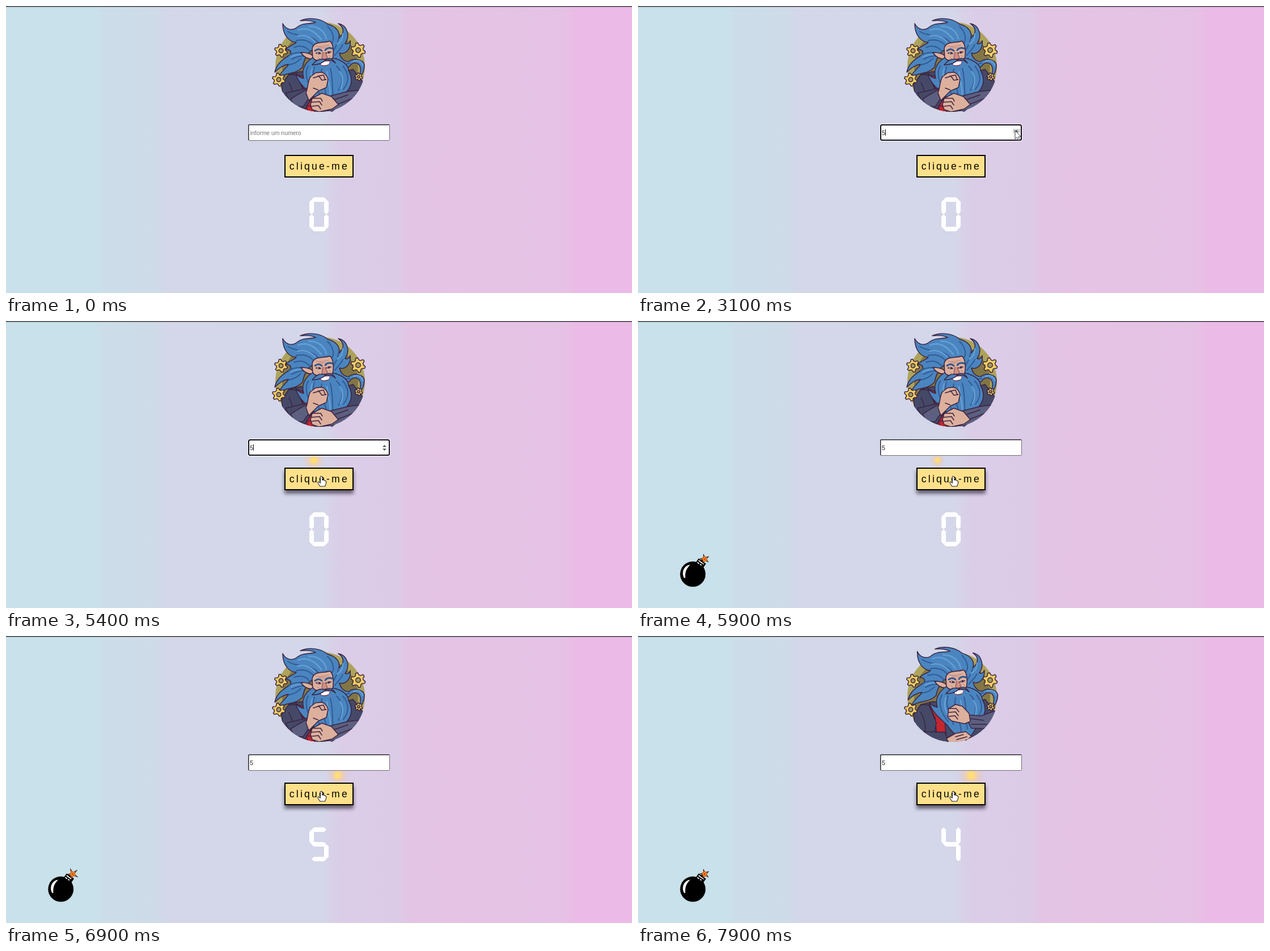
Animation, 1104 px wide and 507 px high, one loop 8 s. Source, as an HTML page:

```html
<!DOCTYPE html>
<html lang="pt">
<head>
<meta charset="utf-8">
<style>
html, body { margin: 0; width: 100%; height: 100%; overflow: hidden; }
svg {
  display: block; width: 100vw; height: 100vh;
  background: linear-gradient(90deg, #c8e1ea 14.2%, #ccdde9 15.6%, #cedbe9 23.8%, #d3d7e9 25.6%,
    #d4d6e9 50.5%, #dbcde7 53.5%, #dccbe7 62.5%, #e4c4e5 64.5%, #e5c2e5 89%, #ecbae6 91%);
}
text { font-family: "Liberation Sans", Arial, sans-serif; }
.ink { stroke: #3a2340; stroke-width: 1.5; stroke-linejoin: round; }
.line { fill: none; stroke-linecap: round; }
.skin { fill: #ddb09d; }
.robe { fill: #454967; }
.sleeve { fill: #5c5f80; }
.red { fill: #c2262f; }
.hair { fill: #4a85c0; }
.shade { stroke: #335a94; stroke-width: 2; }
.shine { stroke: #649fd4; stroke-width: 2.6; }
</style>
</head>
<body>
<svg viewBox="0 0 1104 507" preserveAspectRatio="none">
  <defs>
    <clipPath id="disc"><path d="M474 0H634V107A79.5 79.5 0 0 1 474 107Z"/></clipPath>
    <filter id="blur" x="-20%" y="-50%" width="140%" height="200%"><feGaussianBlur stdDeviation="3.4"/></filter>
    <radialGradient id="glow">
      <stop offset="0" stop-color="#ffe282"/><stop offset=".24" stop-color="#ffdb74"/>
      <stop offset=".36" stop-color="#f6d29c" stop-opacity=".75"/><stop offset=".65" stop-color="#eccaa9" stop-opacity=".4"/>
      <stop offset="1" stop-color="#e8c3b8" stop-opacity="0"/>
    </radialGradient>
  </defs>
  <rect width="1104" height="1.6" fill="#48454d"/>

  <g id="wizard">
    <circle cx="554" cy="107" r="79" fill="#ada35b"/>
    <circle cx="554" cy="107" r="67" fill="#827646"/>
    <g clip-path="url(#disc)">
      <path class="robe ink" d="M487 139L499 121L519 116L590 118L612 112L634 140V190H500Z"/>
      <path class="red ink" d="M513 121L528 126L541 148L544 188L528 186L524 145Z"/>
      <path class="robe ink" d="M499 121L513 122L526 153L520 190H492L486 139Z"/>
      <path class="line ink" d="M499 135C506 148 508 160 506 172"/>
    </g>
    <g id="head">
      <g id="mane">
        <path class="hair ink" d="M540 78C530 84 525 98 523 108C510 122 496 116 480 127C485 114 495 111 498 103C488 104 480 111 474 117C477 100 491 93 501 86
          C505 80 499 76 493 77C498 70 507 70 512 64C500 64 488 52 488 31C494 43 506 44 514 37C524 29 536 32 546 29
          C538 25 528 25 519 26C534 19 556 22 567 32C582 36 590 45 587 57C597 48 597 38 586 31C603 34 607 54 598 66
          C602 68 606 66 607 61C609 78 597 86 588 83C590 92 597 99 605 98C614 91 630 94 632 104C632 116 628 123 621 129
          C626 118 627 109 622 103C617 99 611 100 607 105C603 110 597 110 592 107L578 100Z"/>
        <path class="line shade" d="M497 45C513 56 533 47 550 64M512 61C525 58 536 62 542 70M508 73C521 68 532 73 537 82M499 87C512 80 525 82 534 85M504 94C518 87 526 87 529 91M499 104C511 102 515 97 520 93M567 36C580 49 579 61 573 67M586 58C586 67 579 74 578 79M594 68C591 76 583 82 580 87M582 92C588 102 597 105 606 101"/>
        <path class="line shine" d="M515 43C530 36 543 43 556 59M534 36C549 35 562 44 565 58M514 53C526 50 537 55 545 63M503 90C509 86 514 85 520 86M594 49C594 58 590 64 584 67M613 98C621 94 628 99 629 105"/>
      </g>
      <path class="skin ink" d="M541 94C532 94 525 90 520 82C529 82 536 83 541 88Z"/>
      <path class="skin ink" d="M540 75C543 61 560 66 571 62C578 66 578 82 576 95C570 107 546 106 541 96Z"/>
      <path class="line" stroke="#b77d78" d="M546 71Q557 73 569 69M551 74H567M549 90L554 94M570 87L574 91"/>
      <path class="line" stroke="#2e568f" stroke-width="3" d="M545 79Q551 74 557 79M563 78Q568 72 575 75"/>
      <path fill="#f3e2da" stroke="#3a2340" d="M546 83Q552 80 556 84Q551 86 546 83ZM564 83Q569 79 574 81Q570 85 564 83Z"/>
      <path fill="#3a2340" d="M551 82h3v2h-3zM568 81h3v2h-3z"/>
      <path fill="#cf8f83" stroke="#744451" d="M559 81L557 92Q561 97 567 91L563 82"/>
      <path class="hair ink" d="M541 91C529 99 520 111 525 128C520 127 514 123 511 119C516 139 532 149 542 159C550 171 559 181 575 186
        C587 179 593 164 598 154C609 145 613 129 604 114C604 104 593 95 576 92C572 96 568 97 563 94C554 97 546 99 541 91Z"/>
      <path class="line shade" d="M533 106C525 120 532 139 544 153M544 108C537 127 550 142 553 158M557 111C552 131 566 148 567 171M572 110C578 133 574 151 578 166M583 106C596 118 594 139 586 149M594 106C608 123 603 137 595 147"/>
      <path class="line shine" d="M540 111C535 126 540 137 547 145M566 116C568 132 572 145 572 157M589 116C596 126 594 138 590 146"/>
      <path fill="#773c50" d="M550 100Q562 96 572 97Q571 108 558 106Z"/>
      <path fill="#fff" d="M555 100Q563 97 571 98L569 103Q562 106 556 104Z"/>
      <path class="hair ink" d="M563 95C553 92 548 95 540 104C552 104 558 101 563 96C570 94 576 96 581 101C575 91 568 91 563 95Z"/>
    </g>
    <g id="gears"></g>

    <g id="armsUp" clip-path="url(#disc)">
      <path class="robe ink" d="M493 154L531 145L541 160L528 181H507Z"/>
      <path class="sleeve ink" d="M502 164L529 148L536 160L524 178L508 177Z"/>
      <path class="skin ink" d="M529 153C533 145 532 132 537 125L546 118L557 117Q566 120 568 130L565 144L551 150L534 167Z"/>
      <path class="line ink" d="M542 127L552 124L557 131M550 124L560 122L563 130M557 131L565 130M550 148L542 145"/>
      <path class="sleeve ink" d="M571 159L603 151L635 147L626 170L588 188L563 184Z"/>
      <path class="line ink" d="M580 165L603 157M584 174L615 162"/>
      <path class="red ink" d="M530 176L542 178L545 188H532Z"/>
      <path class="skin ink" d="M540 163L557 154L574 160L586 174L575 182L552 187L540 183L537 174Z"/>
      <path class="line ink" d="M540 163L555 163L558 168M538 170L553 169L557 175M540 177L551 176L555 182"/>
    </g>
    <g id="armsDown" clip-path="url(#disc)">
      <path class="sleeve ink" d="M575 139L605 141L634 131L628 164L588 163Z"/>
      <path class="line ink" d="M587 146L610 149M588 156L615 156"/>
      <path class="skin ink" d="M548 128L560 121L572 124L584 137L586 151L576 155L553 150L546 143Z"/>
      <path class="line ink" d="M548 128L561 128L566 134M547 135L560 134L565 141M548 142L559 141L564 147"/>
      <path class="robe ink" d="M502 169L541 170L550 190H510Z"/>
      <path class="skin ink" d="M544 181L560 172L578 169L588 177L577 188H548Z"/>
      <path class="line ink" d="M560 178L574 174M562 183L580 178"/>
    </g>
  </g>

  <circle id="spark" cy="246" fill="url(#glow)"/>

  <g id="field">
    <rect id="halo" x="426" y="208" width="252" height="31" rx="4" fill="#fff" opacity=".75"/>
    <rect x="427" y="209" width="250" height="29" rx="2.5" fill="#fff"/>
    <path id="inset" fill="none" stroke-width="1.5" d="M427.75 237V211Q427.75 209.75 429 209.75H676" stroke="#27272b"/>
    <path id="outset" fill="none" d="M428 237.5H675.5Q676.5 237.5 676.5 236.5V210" stroke="#6d6d72"/>
    <rect id="ring" x="428" y="210" width="248" height="27" rx="2.5" fill="none" stroke="#101014" stroke-width="2"/>
    <text id="value" y="228"></text>
    <path id="caret" d="M436.5 217.5V229" stroke="#111"/>
    <g id="spinner">
      <rect id="press" x="661" y="217" width="13" height="7"/>
      <path fill="#505055" d="M664 222.5L667.5 219L671 222.5ZM664 225.5L667.5 229L671 225.5Z"/>
    </g>
  </g>

  <rect id="shadow" x="491" y="269" width="122" height="40" fill="#1c1426" filter="url(#blur)"/>
  <g id="button">
    <rect x="492" y="264" width="120" height="38" fill="#ffe08a" stroke="#000" stroke-width="2"/>
    <text x="499.8" y="289" font-size="17.6" letter-spacing="3.2">clique-me</text>
  </g>

  <path id="digit" fill="#fff"/>

  <g id="bomb">
    <circle cx="96.7" cy="447.2" r="22.4"/>
    <path fill="#fff" d="M81.5 454C76 444 81 432 92 430.5C85 438 82.5 444 83.5 454Z"/>
    <g transform="rotate(35 110 429)">
      <rect x="102" y="423" width="16" height="14"/>
      <path stroke="#fff" stroke-width="1.8" d="M104 426H115M104 430H108M110 430H113"/>
    </g>
    <path d="M111 425L116 419" stroke="#000" stroke-width="2"/>
    <polygon id="rays"/>
    <polygon id="flame" fill="#f98a1e" stroke="#8c2c0c" stroke-width=".7"/>
    <circle cx="117.5" cy="420.5" r="1.6" fill="#e03312"/>
  </g>

  <path id="arrow" d="M0 0V15L3.5 11.8L6 17.4L8.4 16.3L6 10.9H10.6Z" fill="#fff" stroke="#222" stroke-width=".9"/>
  <path id="hand" d="M-1.7 1.5Q0 -1 1.7 1.5V7Q3.4 5.8 4.5 7.5Q6.4 6.7 7 8.7Q9 8.3 8.8 10.8L7.8 15.2L6.5 18H-2.2L-6 12.2Q-6.4 9.7 -4.2 10.2L-1.7 12.2Z" fill="#fff" stroke="#222" stroke-width="1.1" stroke-linejoin="round"/>
</svg>
<script>
const LOOP = 8000, STEP = 100;
const el = {};
document.querySelectorAll('[id]').forEach(e => el[e.id] = e);
const set = (id, attrs) => { for (const k in attrs) el[id].setAttribute(k, attrs[k]); };
const show = (id, on) => set(id, { visibility: on ? 'visible' : 'hidden' });
const move = (id, x, y) => set(id, { transform: `translate(${x} ${y})` });

// Eased interpolation through [time, ...values] keys.
function track(t, keys) {
  if (t <= keys[0][0]) return keys[0].slice(1);
  for (let i = 1; i < keys.length; i++) {
    const [a, b] = [keys[i - 1], keys[i]];
    if (t > b[0]) continue;
    const u = (t - a[0]) / (b[0] - a[0]), s = u * u * (3 - 2 * u);
    return a.slice(1).map((v, k) => v + (b[k + 1] - v) * s);
  }
  return keys[keys.length - 1].slice(1);
}

// Points alternate between two radii, `run` points on each.
function cog(cx, cy, teeth, outer, inner, run, turn = 0) {
  const n = teeth * run * 2;
  return Array.from({ length: n }, (_, i) => {
    const a = turn + i / n * 2 * Math.PI, r = i % (2 * run) < run ? outer : inner;
    return `${(cx + r * Math.cos(a)).toFixed(1)},${(cy + r * Math.sin(a)).toFixed(1)}`;
  }).join(' ');
}

el.gears.innerHTML = [[485, 79, 11.5], [621, 78, 13], [481, 130, 11.5], [622, 125, 7]].map(([x, y, r]) =>
  `<polygon class="ink" fill="#efcd60" points="${cog(x, y, 6, r, r * .7, 2, .2)}"/>
   <circle class="ink" cx="${x}" cy="${y}" r="${r * .32}" fill="#a99b61"/>`).join('');

const vert = (x, a, b) => `M${x} ${a}l4 4V${b - 4}l-4 4l-4 -4V${a + 4}Z`;
const horiz = y => `M539 ${y}l4 -4H561l4 4l-4 4H543Z`;
const digits = {
  0: [342, 394].map(horiz).join('') + [539, 565].map(x => vert(x, 342, 368) + vert(x, 368, 394)).join(''),
  5: [342, 368, 394].map(horiz).join('') + vert(539, 342, 368) + vert(565, 368, 394),
  4: horiz(368) + vert(539, 338, 368) + vert(565, 338, 368) + vert(565, 368, 398)
};

const clicks = [1600, 1900, 2200, 2500, 2800];
const pointer = [[300, 100, 5], [400, 168, 30], [900, 661, 222], [1100, 661, 222], [1200, 665, 220],
  [3100, 665, 220], [3900, 545, 276], [4100, 539, 272], [4400, 541, 273], [4600, 543, 273], [5300, 556, 274]];
const sparkle = [[3800, 566, 0], [4100, 566, 12], [4500, 584, 17], [5400, 543, 20], [5900, 528, 14],
  [6300, 549, 18], [6900, 585, 20], [7400, 560, 14], [7900, 588, 24]];

function draw(t) {
  const count = clicks.filter(c => t >= c).length;
  const blown = t >= 5600, focus = count > 0 && !blown;
  const over = t >= 3800;

  el.value.textContent = count || 'informe um numero';
  set('value', count ? { x: 430, fill: '#222', 'font-size': 10.8 } : { x: 430.5, fill: '#757579', 'font-size': 10.4 });
  ['halo', 'ring'].forEach(id => show(id, focus));
  ['inset', 'outset'].forEach(id => show(id, !focus));
  const blinkFrom = count ? clicks[count - 1] : 0;
  const blinkOff = t > 4400 && t < 5400 ? (t - 4400) % 1000 < 500 : t < 4000 && (t - blinkFrom) % 1000 >= 500;
  show('caret', focus && !blinkOff);
  show('spinner', t >= 1200 && !blown);
  const hover = t >= 1200 && t < 3200;
  set('press', { fill: clicks.includes(t) ? '#929296' : hover ? '#d2d2d4' : '#fff' });

  const [x, y] = track(t, pointer);
  move('arrow', x, y);
  move('hand', x, y);
  show('arrow', t >= 400 && !over);
  show('hand', over);

  const [lift] = track(t, [[3700, 0], [4000, 1]]);
  move('button', 0, -4 * lift);
  set('shadow', { opacity: .62 * lift, transform: `translate(0 ${-4 * lift})` });
  const [sx, r] = track(t, sparkle);
  set('spark', { cx: sx, r });

  set('digit', { d: digits[t < 6600 ? 0 : t < 7600 ? 5 : 4] });

  show('bomb', blown);
  const beat = (t / STEP) % 4, size = beat === 3 ? 9.5 : 12 - beat * .4;
  set('rays', { points: cog(117.5, 420.5, 5, size, 3.4, 1, .45 + beat * .08) });
  set('flame', { points: cog(117.5, 420.5, 5, size * .68, 3.4, 1, .45 + beat * .08) });

  const [pose] = track(t, [[7300, 0], [7900, 1]]);
  move('head', 3 * pose, -2 * pose);
  set('mane', { transform: `rotate(${1.5 * pose} 554 90)` });
  move('armsUp', 10 * pose, 5 * pose);
  show('armsUp', t < 7600);
  show('armsDown', t >= 7600);
}

const start = performance.now();
(function tick() {
  draw(Math.floor((performance.now() - start) % LOOP / STEP) * STEP);
  requestAnimationFrame(tick);
})();
</script>
</body>
</html>
```
